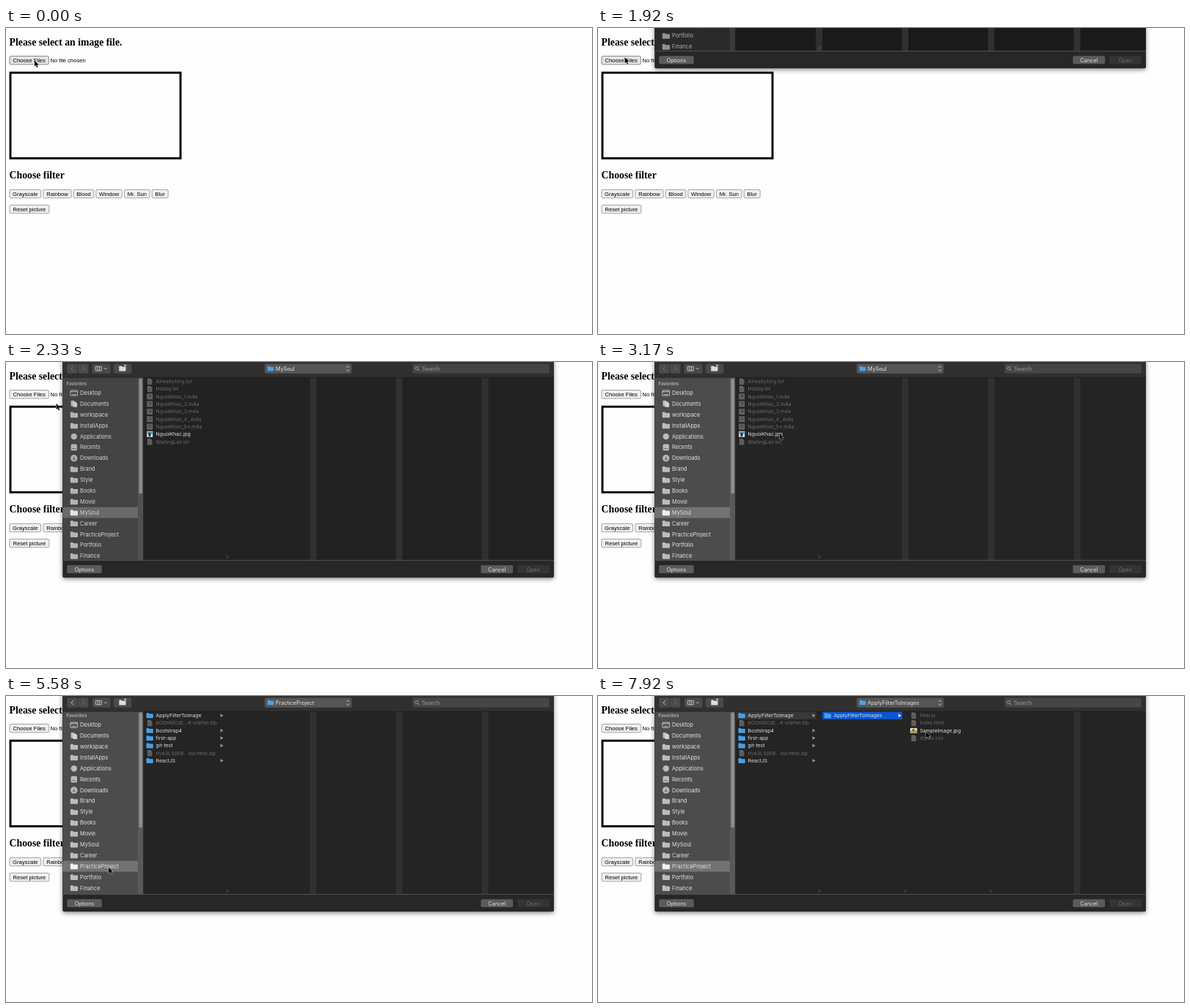
Write an HTML page that moves like this. It is 800 px wide and 419 px high and loops after 8 s.

```html
<!DOCTYPE html>
<html lang="en">
<head>
<meta charset="utf-8">
<title>Image filter page</title>
<style>
  html, body { margin: 0; width: 100%; height: 100%; overflow: hidden; background: #fefefe; }
  svg { display: block; width: 100vw; height: 100vh; }
  text { white-space: pre; }
  .head { font: bold 13.76px "Liberation Serif", "Times New Roman", serif; }
  .page { font: 7.64px "Liberation Sans", Arial, sans-serif; }
  .btn rect { fill: #efefef; stroke: #767676; stroke-width: .65; }
  .btn.hover rect { fill: #e5e5e5; stroke: #4f4f4f; }
  .btn.press rect { fill: #f5f5f5; stroke: #8d8d8d; }
  .ui { font: 7.3px Inter, "Open Sans", sans-serif; fill: #e2e2e2; }
  .side { font-size: 7.37px; }
  .file { font-size: 6.84px; }
  .off { fill: #6c6c6c; }
  .mid { text-anchor: middle; }
  .line { fill: none; stroke: #ddd; stroke-width: .8; }
  #panel { filter: drop-shadow(0 2px 3px rgba(0, 0, 0, .45)); }
</style>
</head>
<body>
<svg id="stage" viewBox="0 0 800 419" preserveAspectRatio="none">
  <defs>
    <clipPath id="sideClip"><rect x="77" y="21.5" width="111" height="250"/></clipPath>
    <path id="folder" d="M0 1.2q0-.9.9-.9h2.6l1 1.2h5q.8 0 .8.8v4.9q0 .8-.8.8H.8q-.8 0-.8-.8z"/>
    <path id="sheet" d="M0 0h4.2l2.3 2.3v6.2H0z"/>
  </defs>
  <g id="page"></g>
  <g id="panel">
    <rect x="77.3" y="-20" width="670.7" height="315.3" rx="2" fill="#272727"/>
    <g id="bar"></g>
    <g id="body"></g>
    <g id="sideWrap" clip-path="url(#sideClip)">
      <rect x="77.3" y="21" width="110.7" height="251" fill="#2a2a2a"/>
      <rect class="lit" x="77.3" y="21" width="110.7" height="251" fill="#4c4c4c"/>
      <g id="side"></g>
      <rect x="180" y="21" width="8" height="251" fill="#fff" opacity=".07"/>
      <rect x="181.5" y="22.5" width="4.6" height="158" rx="2.3" fill="#a0a0a0" opacity=".75"/>
      <rect x="187.4" y="21" width=".6" height="251" fill="#181818"/>
    </g>
    <g id="foot"></g>
  </g>
  <path id="cursor" d="M0 0V8.3L1.9 6.6 3.2 9.6 4.6 9 3.3 6H5.9Z" fill="#000" stroke="#fff" stroke-width=".75" paint-order="stroke"/>
</svg>
<script>
const FPS = 12, FRAMES = 96;
const $ = id => document.getElementById(id);
const text = (x, y, s, cls = 'ui', extra = '') => `<text x="${x}" y="${y}" class="${cls}" ${extra}>${s}</text>`;
const box = (x, y, w, h, fill, rx = 0) => `<rect x="${x}" y="${y}" width="${w}" height="${h}" rx="${rx}" fill="${fill}"/>`;
const path = (d, extra = '') => `<path class="line" d="${d}" ${extra}/>`;
const use = (id, x, y, fill, scale = 1) => `<use href="#${id}" transform="translate(${x} ${y}) scale(${scale})" fill="${fill}"/>`;

// Web page
const button = (x, y, w, label, id = '') =>
  `<g class="btn" id="${id}"><rect x="${x}" y="${y}" width="${w}" height="11.4" rx="1.7"/>` +
  text(x + w / 2, y + 8.4, label, 'page mid') + '</g>';

$('page').innerHTML =
  text(4.6, 23.6, 'Please select an image file.', 'head') +
  button(4.9, 38.5, 53.5, 'Choose Files', 'choose') +
  text(60.5, 46.9, 'No file chosen', 'page') +
  '<rect x="6" y="61.2" width="232.2" height="117.2" fill="none" stroke="#000" stroke-width="2.9"/>' +
  text(4.6, 206.1, 'Choose filter', 'head') +
  [[4.9, 42.7, 'Grayscale'], [50.9, 38.2, 'Rainbow'], [92.1, 27.7, 'Blood'], [122.9, 35.5, 'Window'],
   [161.5, 34.7, 'Mr. Sun'], [199.3, 22, 'Blur']].map(([x, w, s]) => button(x, 221.3, w, s)).join('') +
  button(4.9, 242.4, 54, 'Reset picture');

// Panel footer
const footButton = (x, w, label, on) =>
  box(x, 278.3, w, 11, on ? '#5b5b5b' : '#343434', 1.8) +
  text(x + w / 2, 286.5, label, on ? 'ui mid' : 'ui mid off');

$('foot').innerHTML = box(77.3, 271.3, 670.7, .8, '#5a5a5a') +
  footButton(83.3, 47.5, 'Options', true) +
  footButton(648.3, 43.8, 'Cancel', true) +
  footButton(697.8, 44, 'Open', false);

// Toolbar
function drawBar(title, canBack) {
  const pill = (x, w) => box(x, 2.4, w, 13.4, '#4a4a4a', 2);
  $('bar').innerHTML = box(77.3, -20, 670.7, 41, '#303030') + box(77.3, 20.8, 670.7, .7, '#161616') +
    pill(83.3, 14.3) + pill(98.3, 14.3) + pill(117.8, 25) + pill(146.8, 24.6) +
    path('M92 6l-3 3.1 3 3.1', canBack ? '' : 'opacity=".35"') + path('M104 6l3 3.1-3 3.1', 'opacity=".35"') +
    path('M122.3 6.3h8v5.6h-8zM125 6.3v5.6M127.7 6.3v5.6') + path('M133.8 8.2l1.9 1.9 1.9-1.9') +
    use('folder', 154.3, 5.2, '#ddd', .9) + path('M161 4.8h3.6M162.8 3v3.6') +
    box(353.3, 2.4, 118.4, 13.4, '#565656', 2) +
    use('folder', 357, 5.6, '#4ba3ec', .82) + text(368, 11.8, title) +
    path('M464.8 7.6l1.8-2 1.8 2M464.8 10.6l1.8 2 1.8-2') +
    box(555, 2.6, 186.7, 13, '#464646', 2) +
    '<circle cx="560.8" cy="8.6" r="2.1" class="line" style="stroke:#aaa"/>' +
    path('M562.4 10.3l2 2', 'style="stroke:#aaa"') + text(568, 11.8, 'Search', 'ui', 'style="fill:#999"');
}

// Sidebar
const places = ['Desktop', 'Documents', 'workspace', 'InstallApps', 'Applications', 'Recents', 'Downloads', 'Brand',
  'Style', 'Books', 'Movie', 'MySoul', 'Career', 'PracticeProject', 'Portfolio', 'Finance'];
const ICON = '#bcbcbc';
const placeIcons = {
  Desktop: y => `<rect x="88" y="${y - 3.6}" width="9.6" height="7.2" rx=".8" class="line"/>` +
    path(`M88 ${y - 1.8}h9.6M90 ${y + 2}h5.6`),
  Documents: y => use('sheet', 88.6, y - 4.6, ICON, .9) + use('sheet', 91.6, y - 2.9, '#d4d4d4', .85),
  Applications: y => `<circle cx="92.8" cy="${y}" r="4.2" fill="${ICON}"/>`,
  Recents: y => box(88.6, y - 4.4, 8.4, 8.8, ICON, 1.6) + path(`M90.2 ${y + 1.6}h5.2`, 'style="stroke:#555"'),
  Downloads: y => `<circle cx="92.8" cy="${y}" r="4.7" fill="${ICON}"/>` +
    path(`M92.8 ${y - 2.6}v5M90.8 ${y + .4}l2 2 2-2`, 'style="stroke:#444"')
};
function drawSide(selected) {
  $('side').innerHTML = text(82.4, 29.2, 'Favorites', 'ui', 'style="font-size:6.3px;font-weight:600;fill:#b4b4b4"') +
    places.map((name, i) => {
      const y = 39.7 + i * 14.88;
      const icon = placeIcons[name];
      return (name === selected ? `<rect x="77.3" y="${y - 7.4}" width="102.7" height="14.8" fill="#fff" opacity=".22"/>` : '') +
        (icon ? icon(y) : use('folder', 87.8, y - 4, name === selected ? '#f0f0f0' : ICON)) +
        text(101, y + 2.6, name, 'ui side');
    }).join('');
}

// File columns: a leading mark gives the kind of entry
const soul = ['-AlreadySing.txt', '-Hobby.txt', '~NguoiKhac_1.m4a', '~NguoiKhac_2.m4a', '~NguoiKhac_3.m4a',
  '~NguoiKhac_4_.m4a', '~NguoiKhac_5*.m4a', '#NguoiKhac.jpg', '-WaitingList.txt'];
const practice = ['/ApplyFilterToImage', '-bOGnMCzE…4-starter.zip', '/Bootstrap4', '/first-app', '/git-test',
  '-Hvk3LS0HE…tus.html.zip', '/ReactJS'];
const images = ['/ApplyFilterToImages'];
const site = ['-filter.js', '-index.html', '=SampleImage.jpg', '-styles.css'];
const COL = 117.4;

const fileIcons = {
  '/': (x, y) => use('folder', x - .4, y - 3.7, '#45a0ea', .9),
  '-': (x, y) => use('sheet', x + 1, y - 4.2, '#626262') +
    path(`M${x + 2.4} ${y}h3.6M${x + 2.4} ${y + 2}h3.6`, 'style="stroke:#444;stroke-width:.5"'),
  '~': (x, y) => box(x + .3, y - 4, 8, 8, '#646464', .5) +
    path(`M${x + 3.4} ${y + 2}v-4h2.4v3.4`, 'style="stroke:#363636"'),
  '#': (x, y) => box(x + .3, y - 4, 8, 8, '#dfe7ea', .5) + box(x + 1, y - 3.2, 6.6, 3, '#4b8fb4') +
    box(x + 2.6, y - 1.6, 3, 4.8, '#26323a'),
  '=': (x, y) => box(x - .6, y - 3.4, 9.4, 6.8, '#e8e3bf') + box(x, y - .2, 8.2, 2.8, '#b59a3c') +
    box(x + 2.4, y - 2.2, 3, 3, '#5f6b36')
};

function drawColumn(list, c, chosen, active) {
  return list.map((entry, i) => {
    const kind = entry[0], x = 192 + c * COL, y = 26.7 + i * 10.3;
    const dim = kind === '-' || kind === '~';
    const mark = i === 0 && chosen
      ? box(188 + c * COL + .8, y - 5, 109, 10.2, active ? '#0a57d0' : 'rgba(255,255,255,.09)') : '';
    const arrow = kind === '/' ? `<path d="M${x + 100.8} ${y - 2.3}l4 2.3-4 2.3z" fill="${active && i === 0 ? '#fff' : '#9a9a9a'}"/>` : '';
    return mark + fileIcons[kind](x, y) + text(x + 12.6, y + 2.4, entry.slice(1), dim ? 'ui file off' : 'ui file') + arrow;
  }).join('');
}

function drawBody(cols, picks, settled) {
  let out = box(188, 21.5, 560, 250, '#1a1a1a') +
    '<rect class="lit" x="188" y="21.5" width="560" height="250" fill="#242424"/>';
  for (let c = 0; c < 4; c++) {
    const x = 297.4 + c * COL;
    if (c >= cols.length || !settled) out += box(x, 21.5, 9, 250, '#303030');
    else out += box(x + 2.4, 21.5, .5, 250, '#2c2c2c');
    if (c < cols.length) out += path(`M${x + 3.6} 265v4M${x + 5.6} 265v4`, 'style="stroke:#5c5c5c;stroke-width:.6"');
  }
  cols.forEach((list, c) => { out += drawColumn(list, c, c < picks, c === picks - 1); });
  $('body').innerHTML = out;
}

// Motion: [frame, value...]
const pointer = [[0, 39, 44.5], [2, 38.6, 42], [4, 37, 37.5], [6, 37.5, 39.5], [7, 37.5, 39.5], [10, 190, 82], [12, 313, 115],
  [14, 215, 92], [17, 36.6, 40], [25, 36.6, 40], [30, 90, 68], [31, 90, 68], [35, 205, 110], [38, 247.6, 97.4],
  [41, 235.8, 100], [50, 155, 169], [55, 155, 169], [61, 138, 241.5], [64, 140, 234.5], [67, 140, 234.5],
  [75, 226, 72], [79, 235, 48.5], [82, 238, 27], [85, 240, 27], [89, 345, 27], [91, 350, 28], [95, 448, 49]];
const drop = [[20, -330], [21, -325], [22, -292], [23, -240], [24, -125], [25, -33], [26, -9], [27, 0]];
const light = [[25, 0], [29, 1]];
const scroll = [[51, 2.8], [52, 1.4], [53, 1.4], [54, 0]];

function at(keys, n) {
  if (n <= keys[0][0]) return keys[0].slice(1);
  const j = keys.findIndex(k => k[0] >= n);
  if (j < 0) return keys[keys.length - 1].slice(1);
  const [a, b] = [keys[j - 1], keys[j]], p = (n - a[0]) / (b[0] - a[0]);
  return a.slice(1).map((v, i) => v + (b[i + 1] - v) * p);
}

function draw(n) {
  const [x, y] = at(pointer, n), [dy] = at(drop, n), [lit] = at(light, n);
  $('cursor').setAttribute('transform', `translate(${x} ${y})`);
  const hover = x > 5 && x < 58 && y > 36 && y < 50;
  $('choose').setAttribute('class', 'btn' + (n === 18 ? ' press' : hover ? ' hover' : ''));

  $('panel').style.display = n < 21 ? 'none' : '';
  $('panel').setAttribute('transform', `translate(0 ${dy})`);
  const title = n < 67 ? 'MySoul' : n < 83 ? 'PracticeProject' : n < 91 ? 'ApplyFilterToImage' : 'ApplyFilterToImages';
  drawBar(title, n >= 67);
  drawSide(n < 66 ? 'MySoul' : 'PracticeProject');
  $('side').setAttribute('transform', `translate(0 ${at(scroll, n)[0]})`);
  $('side').style.opacity = .72 + .28 * lit;

  const cols = n < 67 ? [soul] : [practice];
  if (n >= 84) cols.push(images);
  if (n >= 91) cols.push(site);
  drawBody(cols, n < 83 ? 0 : n < 90 ? 1 : 2, n >= 28);
  document.querySelectorAll('.lit').forEach(el => { el.style.opacity = lit; });
}

let shown = -1;
const start = performance.now();
function tick(now) {
  const t = Math.max(0, now - start) / 1000;
  const n = Math.floor(t * FPS + .05) % FRAMES;
  if (n !== shown) draw(shown = n);
  requestAnimationFrame(tick);
}
tick(start);
</script>
</body>
</html>
```
